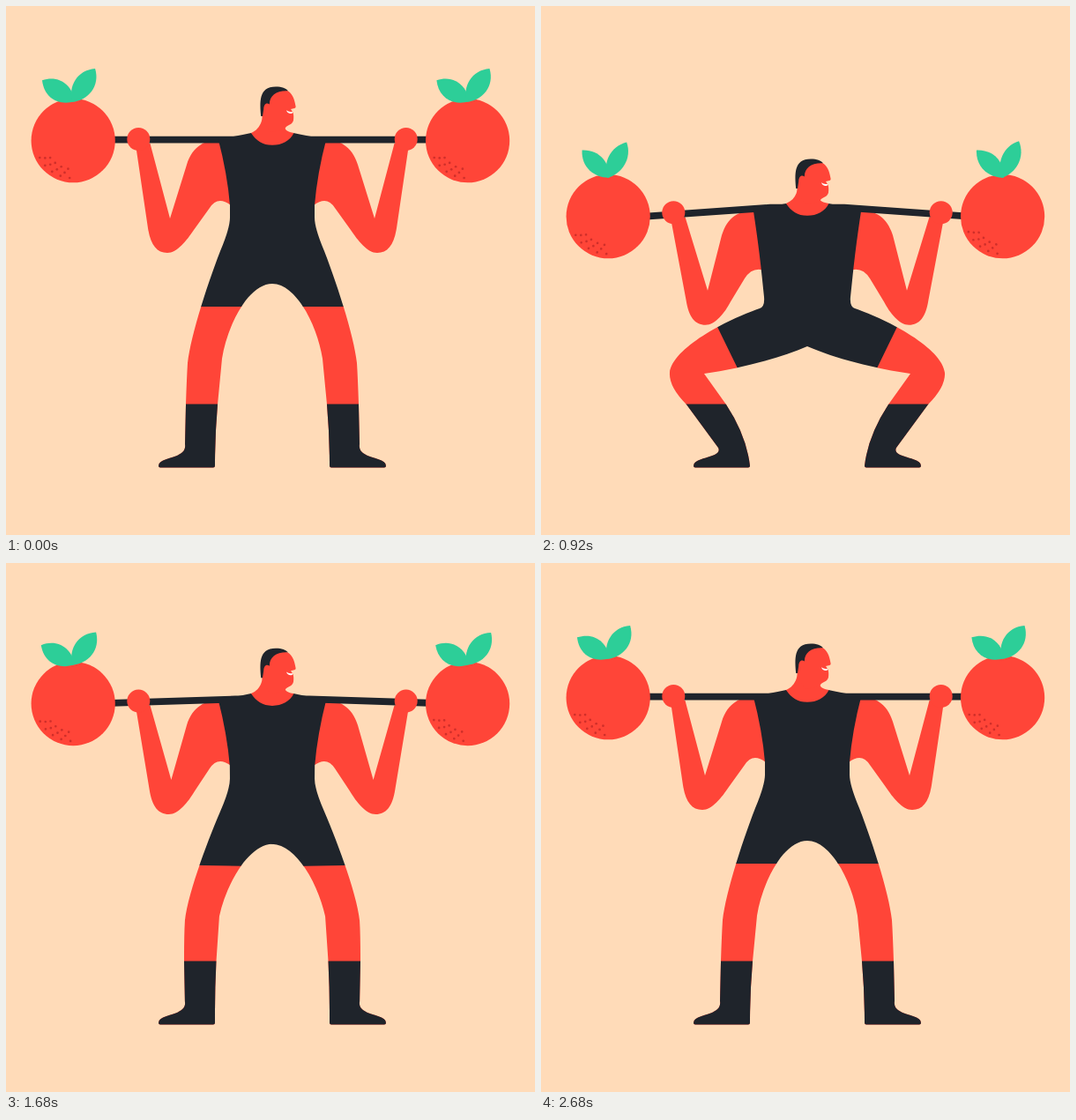
Write an HTML page that moves like this. It is 600 px wide and 600 px high and loops after 2.88 s.

```html
<!DOCTYPE html>
<html lang="en">
<head>
<meta charset="utf-8">
<title>Fruit squat</title>
<style>
  html, body { margin: 0; width: 100%; height: 100%; overflow: hidden; background: #ffdbb8; }
  svg { display: block; width: 100vw; height: 100vh; }
  .red { fill: #ff4538; }
  .dark { fill: #1f242b; }
  .leaf { fill: #2dce98; }
  .dots { fill: #cf2f2a; }
  .bar { fill: none; stroke: #1f242b; stroke-width: 7.8; }
</style>
</head>
<body>
<svg id="stage" viewBox="0 0 600 600"></svg>
<script>
const LOOP = 2880, STEP = 40, DEPTH = 80;
const MIRROR = 'matrix(-1 0 0 1 604 0)';
const stage = document.getElementById('stage');
const set = (id, name, value) => document.getElementById(id).setAttribute(name, value);
const clamp = v => Math.max(0, Math.min(1, v));
const ease = p => p < 0.5 ? 4 * p ** 3 : 1 - 4 * (1 - p) ** 3;
const bump = (t, mid, width) => Math.exp(-(((t - mid) / width) ** 2));

// 0 standing, 1 at the bottom; each way takes `span` ms
const squat = (t, down, up, span) =>
  ease(clamp((t - down) / span)) - ease(clamp((t - up) / span));

// The fruit overshoots and settles once the body has stopped
function bounce(t) {
  const u = Math.max(0, t - 1720);
  return -8 * Math.exp(-u / 200) * Math.sin(u / 100);
}

// Leaves close on the way down, spread on the way up, then ring out
const flap = t => 33 * bump(t, 655, 265) - 29 * bump(t, 1440, 180) +
  15 * bump(t, 1900, 150) - 5 * bump(t, 2170, 130);

function spots() {
  let out = '';
  for (let i = 0; i < 13; i++) {
    const a = (153 - 4.8 * i) * Math.PI / 180, r = 42.5 - 5 * (i % 3);
    out += `<circle cx="${r * Math.cos(a)}" cy="${r * Math.sin(a)}" r="1.35"/>`;
  }
  return out;
}

const leaf = (id, len) => `<path id="${id}" class="leaf"
  d="M0 2C-14 -10 -16 ${13 - len} 0 ${-len}C16 ${13 - len} 14 -10 0 2Z"/>`;
const half = (k, parts) => `<g ${k === 'r' ? `transform="${MIRROR}"` : ''}>${parts}</g>`;
const limbs = k => half(k, `
  <path id="arm-${k}" class="red"/>
  <path id="bar-${k}" class="bar"/>
  <circle id="hand-${k}" class="red" cx="150.3" r="13"/>`);
const trunk = k => half(k, `
  <clipPath id="skin-${k}"><polygon id="skinArea-${k}"/></clipPath>
  <clipPath id="cloth-${k}">
    <polygon id="clothArea-${k}"/><rect x="100" y="451.6" width="203" height="80"/>
  </clipPath>
  <path id="leg-${k}" class="red" clip-path="url(#skin-${k})"/>
  <path id="suit-${k}" class="dark" clip-path="url(#cloth-${k})"/>`);
const fruit = k => `<g id="fruit-${k}">
  <circle class="red" r="47.6"/>
  <g id="spots-${k}" class="dots">${spots()}</g>
  ${leaf(`leaf-${k}1`, 42)}${leaf(`leaf-${k}2`, 44)}
</g>`;

stage.innerHTML = `<rect width="600" height="600" fill="#ffdbb8"/>
  ${limbs('l')}${limbs('r')}${fruit('l')}${fruit('r')}${trunk('l')}${trunk('r')}
  <path id="neck" class="red"/>
  <g id="head">
    <path class="red" d="M290 117C290 99 300 95 319 96C324 98.5 327 104 328.6 114Q328.8 116 326 116.2L323 117L325 120Q326.4 122 326.2 127Q326.4 133 321 135Q317 136.5 316 140L300 143L291 130Z"/>
    <path class="dark" d="M289.2 125C288 110 286 91.6 306 91.6C313 91.6 317.5 93.6 320 96.2C307 95.5 299 101 298.8 111.5C295 109 292.4 112 292.2 117L291 125Z"/>
    <path fill="#fff" d="M318 118.3Q319.4 122.4 323.6 122Q325.8 121.6 325.2 119.8Q321 120.8 318 118.3Z"/>
  </g>`;

// s: shoulder drop, sag: fruit drop below the shoulders
function armPath(s, sag) {
  const e = 0.6 * sag, hy = s + 0.55 * sag, vy = s + 0.3 * sag;
  return `M147 ${157 + hy}L${161 + e} ${252 + vy}
    C${164 + e} ${271 + vy} ${171 + e} ${280 + vy} ${183 + e} ${280 + vy}
    C${194 + e} ${280 + vy} ${205 + e} ${266 + vy} ${213 + e / 2} ${254 + vy}
    L231 ${229 + s}Q240 ${214.5 + s} 255 ${226 + 0.93 * s}L256 ${160 + s}L244 ${151 + s}
    C226 ${152 + s} 212 ${158 + s} 205 ${180 + s}
    L${186 + 0.5 * sag} ${241 + vy}L163.5 ${156 + hy}Z`;
}

// Left half of the body, blended from standing (u = 0) to squatting (u = 1)
function bodyPath(s, u) {
  const mix = (a, b) => a + (b - a) * u;
  const pt = (x0, y0, x1, y1) => `${mix(x0, x1)} ${mix(y0, y1)} `;
  const kx = mix(206, 146), ky = mix(405, 416);
  const armhole = `M303 ${150 + s}L278 ${144 + s}Q262 ${147.6 + s} 240.7 ${151 + s}
    Q${pt(251, 190, 247, 272)} ${pt(254, 226, 250.5, 306)}`;
  const thigh = `L${pt(254, 240, 253, 330)}Q${pt(254, 252, 254, 341)}${pt(243, 278, 248, 343)}
    C${pt(226, 322, 210, 356)}${kx + 3} ${ky - 28} ${kx} ${ky}`;
  const shin = `Q${kx - 1} ${ky + 16} ${mix(204, 165)} 452L${pt(203, 497, 201, 501)}`;
  const boot = `C205 509 190 511 182 514Q173 516.5 173 521.5Q173 523.5 175 523.5
    L235 523.5Q237 523.5 237 521.5Q${mix(237, 233)} 487 ${mix(240, 210)} 452`;
  const inside = `L${pt(245, 400, 185, 417)}C${pt(251, 362, 225, 411)}${pt(275, 315, 270, 400)}
    ${pt(302, 315, 302, 386)}L303 ${mix(315, 386)}Z`;
  return armhole + thigh + shin + boot + inside;
}

// Wide band on one side of the shorts' hem, which tilts with depth
function hemArea(u, near, far) {
  const a = 64 * u ** 1.4 * Math.PI / 180, dx = Math.cos(a), dy = Math.sin(a);
  const x = 245 - 33.5 * u, y = 341 + 46.5 * u;
  return [[-400, near], [400, near], [400, far], [-400, far]]
    .map(([along, off]) => `${x + dx * along + dy * off},${y + dy * along - dx * off}`).join(' ');
}

function neckPath(s, h) {
  return `M290 ${112 + h}C293 ${126 + h} 290 ${139 + s} 278 ${144 + s}
    C284 ${153 + s} 291 ${157.8 + s} 302 ${157.8 + s}
    C313 ${157.8 + s} 322 ${153 + s} 326.5 ${144 + s}
    C320 ${143 + s} 316 ${141 + s} 316 ${136 + h}L316 ${112 + h}Z`;
}

function draw(t) {
  const u = squat(t, 100, 1067, 800), s = DEPTH * u;
  const h = 82 * squat(t, 107, 1058, 831);
  const drop = 86 * squat(t, 94, 1078, 826) + bounce(t);
  const sag = drop - s, fruitY = 152.7 + drop, barY = 151.7 + s - 0.5 * sag;
  const f = flap(t), leafWidth = 1 - Math.max(0, f) / 120;
  const arm = armPath(s, sag), body = bodyPath(s, u);
  const skin = hemArea(u, 0.7, -250), cloth = hemArea(u, 0, 500);
  const leafPose = angle => `translate(0 -45.5) rotate(${angle}) scale(${leafWidth} 1)`;

  for (const k of ['l', 'r']) {
    const left = k === 'l';
    set(`arm-${k}`, 'd', arm);
    set(`bar-${k}`, 'd', `M80 ${fruitY - 1 + 0.6 * sag}L260 ${barY}H303`);
    set(`hand-${k}`, 'cy', 151 + s + 0.55 * sag);
    set(`leg-${k}`, 'd', body);
    set(`suit-${k}`, 'd', body);
    set(`skinArea-${k}`, 'points', skin);
    set(`clothArea-${k}`, 'points', cloth);
    set(`fruit-${k}`, 'transform', `translate(${left ? 76.2 : 523.6} ${fruitY})`);
    set(`spots-${k}`, 'transform', `rotate(${(left ? -0.45 : 0.45) * sag})`);
    set(`leaf-${k}1`, 'transform', leafPose(-57 + f));
    set(`leaf-${k}2`, 'transform', leafPose(34.5 - (left ? 0.5 : 0.8) * f));
  }
  set('neck', 'd', neckPath(s, h));
  set('head', 'transform', `translate(0 ${h})`);
}

const start = performance.now();
function tick() {
  const t = (performance.now() - start) % LOOP;
  draw(Math.floor(t / STEP) * STEP);
  requestAnimationFrame(tick);
}
tick();
</script>
</body>
</html>
```
